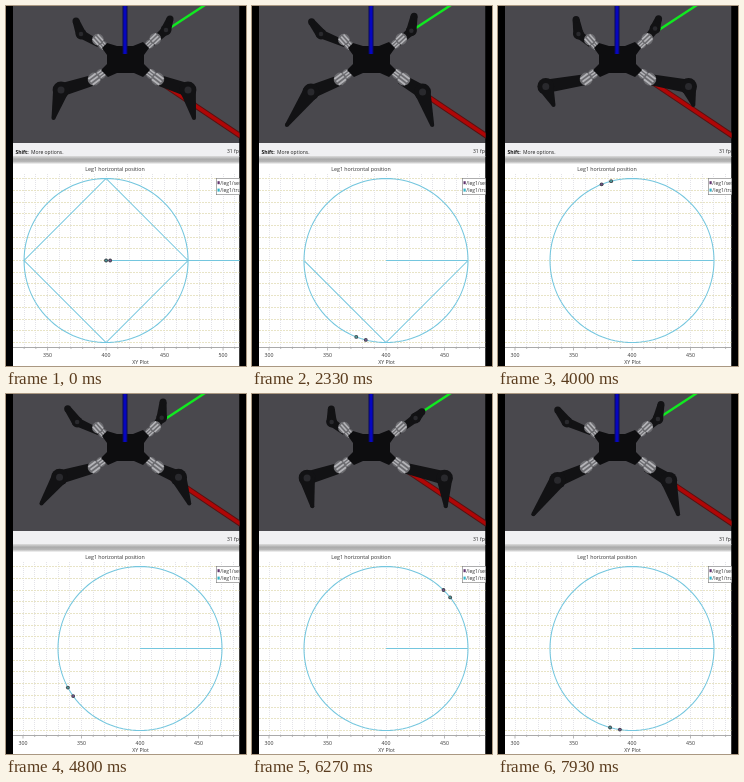
Animation, 240 px wide and 360 px high, one loop 8000 ms. Source, as an HTML page with a canvas:

```html
<!DOCTYPE html>
<html lang="en">
<head>
<meta charset="utf-8">
<title>Leg position plot</title>
<style>
html, body { margin: 0; width: 100%; height: 100%; overflow: hidden; background: #000; }
canvas { display: block; width: 240px; height: 360px; }
</style>
</head>
<body>
<canvas width="240" height="360"></canvas>
<script>
const ctx = document.querySelector('canvas').getContext('2d');
const LOOP = 8000, FPS = 15, FRAMES = 120;
const LEFT = 7, RIGHT = 233.5;
const MID_X = 134, MID_Y = 254.5, RADIUS = 82, SCALE = 1.17;
const START = 0.36;                 // time the circling begins, s
const TURN = 129.6 * Math.PI / 180; // rad per s
const LAG = 0.054;
const DARK = '#121214';
const FONT = '"Open Sans", "Noto Sans", sans-serif';

const clamp = (v, lo = 0, hi = 1) => Math.max(lo, Math.min(hi, v));
const ramp = (t, from, to) => clamp((t - from) / (to - from));

function rect(x, y, w, h, color) {
  ctx.fillStyle = color;
  ctx.fillRect(x, y, w, h);
}

function line(points, color, width = 1, dash = []) {
  ctx.beginPath();
  points.forEach(([x, y]) => ctx.lineTo(x, y));
  ctx.strokeStyle = color;
  ctx.lineWidth = width;
  ctx.setLineDash(dash);
  ctx.stroke();
  ctx.setLineDash([]);
}

function shape(points, color) {
  ctx.beginPath();
  points.forEach(([x, y]) => ctx.lineTo(x, y));
  ctx.closePath();
  ctx.fillStyle = color;
  ctx.fill();
}

function disc(x, y, r, color) {
  ctx.beginPath();
  ctx.arc(x, y, r, 0, 7);
  ctx.fillStyle = color;
  ctx.fill();
}

function text(str, x, y, size = 5.2, align = 'center', weight = '', color = '#333') {
  ctx.font = `${weight} ${size}px ${FONT}`;
  ctx.textAlign = align;
  ctx.fillStyle = color;
  ctx.fillText(str, x, y);
}

// Position on the plotted path relative to its centre, y up, radius 1.
function pathPoint(t) {
  if (t < START) return [0.05 + 0.95 * t / START, 0];
  const a = (t - START) * TURN;
  return [Math.cos(a), Math.sin(a)];
}

function limb(a, b, startWidth, endWidth) {
  const len = Math.hypot(b[0] - a[0], b[1] - a[1]) || 1;
  const nx = (a[1] - b[1]) / len / 2, ny = (b[0] - a[0]) / len / 2;
  shape([
    [a[0] + nx * startWidth, a[1] + ny * startWidth],
    [b[0] + nx * endWidth, b[1] + ny * endWidth],
    [b[0] - nx * endWidth, b[1] - ny * endWidth],
    [a[0] - nx * startWidth, a[1] - ny * startWidth]
  ], DARK);
}

function leg(hip, knee, tip, size, tipWidth) {
  limb(hip, knee, size * 0.75, size * 0.95);
  disc(...knee, size * 0.6, DARK);
  limb(knee, tip, size * 1.15, tipWidth);
  disc(...tip, tipWidth / 2, DARK);
  disc(...knee, size * 0.25, '#29292d');
}

// Two ribbed silver servos, one behind the other along the leg.
function servo(x, y, angle, size) {
  ctx.save();
  ctx.translate(x, y);
  ctx.rotate(angle);
  for (const [cx, r] of [[-size * 0.5, size * 0.5], [size * 0.35, size * 0.65]]) {
    disc(cx, 0, r, '#6c6c70');
    for (let k = -1; k <= 1; k++) {
      line([[cx - r * 0.7, k * r * 0.55], [cx + r * 0.7, k * r * 0.55]], '#b4b4b8', r * 0.28);
    }
  }
  ctx.restore();
}

function axis(from, to, color, edge, width) {
  line([from, to], edge, width + 2);
  line([from, to], color, width);
}

function drawRobot(t) {
  rect(LEFT, 0, RIGHT - LEFT, 137, '#49484d');
  const [px, py] = pathPoint(t);
  const gait = t < START ? [px - 0.05, 0] : [px, py];
  // Ground axes seen by the camera
  const dx = gait[0] * 0.82 + gait[1] * 0.83;
  const dy = gait[0] * 0.57 - gait[1] * 0.55;

  axis([148, 72], [236, 131], '#b00606', '#5a1010', 3.6);
  line([[147, 33], [199, -1]], '#10ea20', 2.4);

  leg([93, 38], [75 + 4 * dx - 5 * dy, 28], [70 + 8 * dx - 6 * dy, 15 + 2 * dy], 9, 7);
  leg([146, 37], [160 + 3 * dx + 6 * dy, 24 + 2 * dy], [164 + 5 * dx + 8 * dy, 13 + 4 * dx + 3 * dy], 9, 7);
  leg([91, 73], [55 + 10 * dy, 84 + 5 * dy], [47.5 + 11 * dx - 4 * dy, 112 + 18 * dy], 14, 4);
  leg([149, 73], [182 + 9 * dx - 6 * dy, 84 + 5 * dy], [188 + 5 * dx - 7 * dy, 112 + 18 * dy], 14, 4);

  servo(94, 36, -2.3, 9);
  servo(147, 35, -0.75, 9);
  servo(91, 71, 2.5, 10);
  servo(149, 71, 0.65, 10);

  shape([
    [101, 37], [111, 40], [127, 40], [137, 36], [143, 42], [138, 49], [138, 58],
    [144, 64], [137, 71], [128, 67], [111, 67], [102, 71], [95, 64], [101, 58], [101, 49], [96, 42]
  ], '#0d0d0f');
  axis([119, 0], [119, 48], '#0606c0', '#0a0a58', 3);
}

function drawStatus(t) {
  rect(LEFT, 137, RIGHT - LEFT, 14, '#f0f0f2');
  const g = ctx.createLinearGradient(0, 150, 0, 158);
  g.addColorStop(0, '#dcdcdc');
  g.addColorStop(0.4, '#aaaaaa');
  g.addColorStop(0.7, '#b8b8b8');
  g.addColorStop(1, '#f7f7f7');
  rect(LEFT, 150, RIGHT - LEFT, 8, g);
  if (t < 4.7) {
    text('Shift:', 9.5, 147.5, 5, 'left', 'bold', '#111');
    text('More options.', 25, 147.5, 5, 'left', '', '#222');
  }
  text('31 fps', 221, 147, 5, 'left', '', '#222');
}

function drawGrid(cx) {
  const step = 10 * SCALE;
  for (let k = -12; k <= 20; k++) {
    const x = Math.floor(cx + k * step) + 0.5, y = Math.floor(MID_Y + k * step) + 0.5;
    line([[x, 168], [x, 341]], '#dcdce2', 0.8, [1, 1]);
    if (y > 168 && y < 341) line([[LEFT, y], [RIGHT, y]], '#e6e1c0', 0.9, [2, 1]);
  }
  line([[LEFT, 341.5], [RIGHT, 341.5]], '#aaa', 1);
  for (let value = 300; value <= 550; value += 10) {
    const x = cx + (value - 400) * SCALE;
    line([[x, 342], [x, value % 50 ? 343 : 344.5]], '#888', 0.6);
    if (value % 50 === 0) text(value, x, 351);
  }
}

const trace = points => line(points, '#74c6de', 1.05);

function drawPlot(t) {
  rect(LEFT, 158, RIGHT - LEFT, 202, '#fff');
  // The view recentres while the oldest samples leave the history.
  const rightmost = 528 - 58 * ramp(t, 0.4, 0.75);
  const cx = MID_X - (rightmost - 470) / 2 * SCALE;
  const at = ([x, y]) => [cx + x * RADIUS, MID_Y - y * RADIUS];
  drawGrid(cx);

  trace(Array.from({ length: 121 }, (_, i) => {
    const a = i * Math.PI / 60;
    return at([Math.cos(a), Math.sin(a)]);
  }));
  trace([[cx, MID_Y], [cx + (rightmost - 400) * SCALE, MID_Y]]);

  const corners = [[1, 0], [0, 1], [-1, 0], [0, -1], [1, 0]];
  const erased = clamp((t - 1.33) / 0.5, 0, 4);
  if (erased < 4) {
    const i = Math.floor(erased), f = erased - i;
    const tail = corners[i].map((v, k) => v + (corners[i + 1][k] - v) * f);
    trace([tail, ...corners.slice(i + 1)].map(at));
  }

  const lead = pathPoint(t);
  const follow = t < LAG ? [0, 0] : pathPoint(t - LAG);
  for (const [point, color] of [[follow, '#4a9c9c'], [lead, '#75528c']]) {
    const [x, y] = at(point);
    disc(x, y, 1.9, '#3d4148');
    disc(x, y, 1.1, color);
  }

  text('Leg1 horizontal position', 109, 164.8, 5.3);
  text('XY Plot', 134.5, 357.8, 5.2);
  rect(210, 172, 30, 17, '#777');
  rect(210.6, 172.6, 30, 15.8, '#fff');
  rect(211.5, 175.2, 2.2, 3, '#61366e');
  rect(211.5, 182.6, 2.2, 3, '#35b4c8');
  text('/leg1/setpoint', 214.3, 178.6, 5, 'left');
  text('/leg1/true', 214.3, 186, 5, 'left');
}

function draw(now) {
  const frame = Math.min(FRAMES - 1, Math.floor((now % LOOP) * FPS / 1000 + 0.1));
  const t = frame / FPS;
  rect(0, 0, 240, 360, '#000');
  ctx.save();
  ctx.beginPath();
  ctx.rect(LEFT, 0, RIGHT - LEFT, 360);
  ctx.clip();
  drawRobot(t);
  drawStatus(t);
  drawPlot(t);
  ctx.restore();
  requestAnimationFrame(() => draw(performance.now()));
}
draw(0);
</script>
</body>
</html>
```
